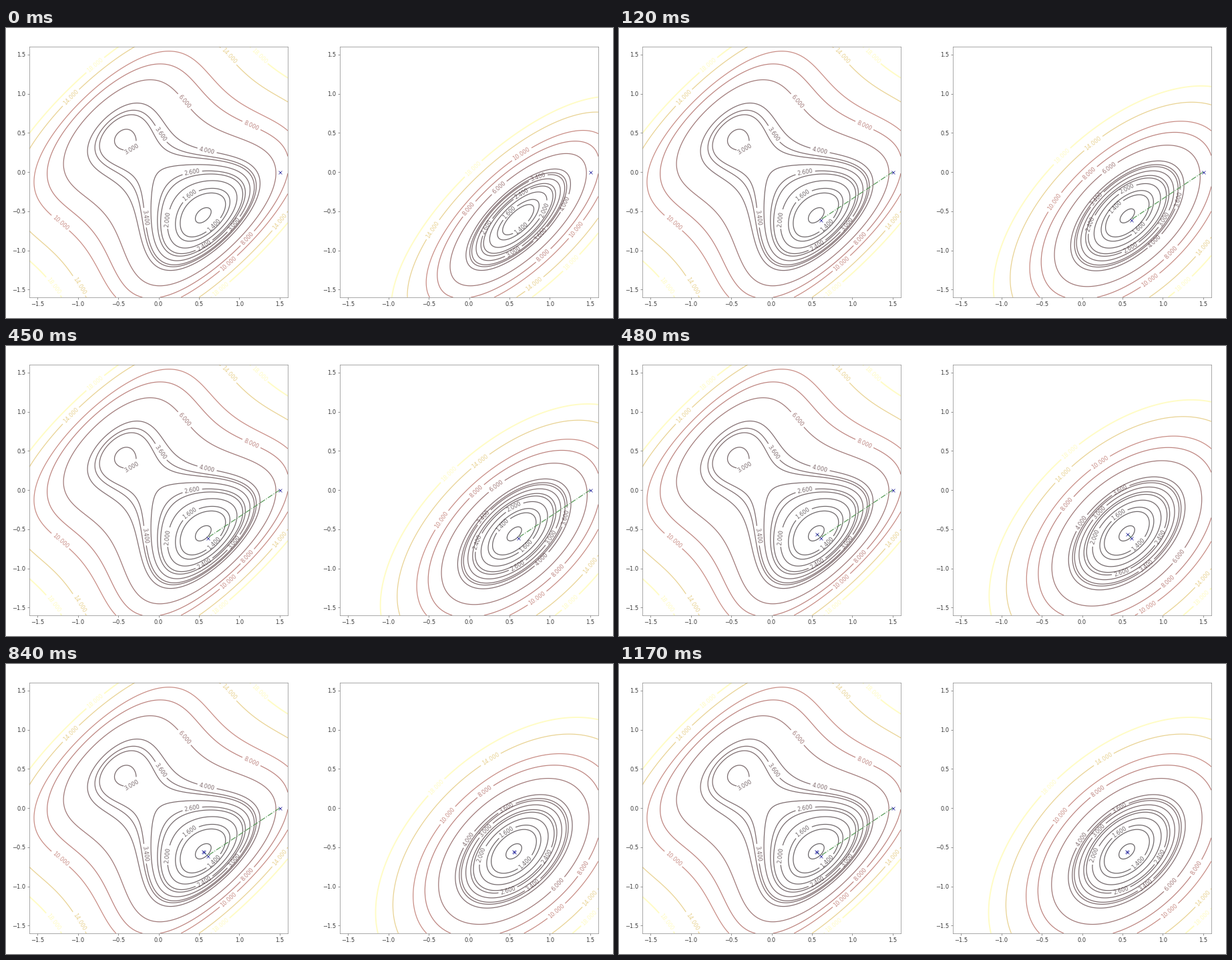
Write a matplotlib script that moves like this. It is 909x435 px and loops after 1.2 s.

```python
import numpy as np
import matplotlib.pyplot as plt
from matplotlib.animation import FuncAnimation
from matplotlib.colors import LinearSegmentedColormap

W, H, DPI = 909, 435, 60
LIM = 1.6
LEVELS = [1, 1.4, 1.6, 2, 2.4, 2.6, 3, 3.4, 3.6, 4, 6, 8, 10, 14, 18]
CMAP = LinearSegmentedColormap.from_list("heat", [
    (0, "#1f181c"), (.18, "#452529"), (.41, "#9c463f"),
    (.53, "#ad5347"), (.76, "#dcba58"), (1, "#fffba6")])


# With s = x - y and t = x + y the surface is g(s) + 2 t^2
def g(s):
    return s**4 - 2 * s**2 - s + 3


def slope(s):
    return 4 * s**3 - 4 * s - 1


def curvature(s):
    return 12 * s**2 - 4


def surface(x, y):
    return g(x - y) + 2 * (x + y)**2


def quadratic(s0, x, y):
    """Second-order model of the surface around s0."""
    d = x - y - s0
    return g(s0) + slope(s0) * d + curvature(s0) / 2 * d**2 + 2 * (x + y)**2


def draw_levels(ax, z):
    """Draw labelled contours and return all their artists."""
    widths = [1.5] * (len(LEVELS) - 1) + [2.3]
    cs = ax.contour(x, y, z, levels=LEVELS, linewidths=widths,
                    cmap=CMAP, alpha=.66)
    labels = ax.clabel(cs, fontsize=10, fmt="%1.3f", inline_spacing=3)
    return [cs, *labels]


def make_axes(left):
    ax = fig.add_axes([left / W, 31 / H, 387 / W, 376 / H])
    ticks = np.arange(-1.5, 1.6, .5)
    ax.set(xlim=(-LIM, LIM), ylim=(-LIM, LIM), xticks=ticks, yticks=ticks)
    return ax


def make_trail(ax):
    return ax.plot([], [], ls="-.", lw=1.5, color="#5a9c5a", marker="x",
                   ms=6, mec="#3c3ca8", zorder=5)[0]


plt.rcParams.update({
    "font.family": "DejaVu Sans", "axes.edgecolor": "#808080",
    "xtick.color": "#606060", "ytick.color": "#606060",
    "xtick.labelcolor": "#383838", "ytick.labelcolor": "#383838"})
fig = plt.figure(figsize=(W / DPI, H / DPI), dpi=DPI, facecolor="white")
left_ax, right_ax = make_axes(35), make_axes(500)
x, y = np.meshgrid(*[np.linspace(-LIM, LIM, 193)] * 2)

# Newton iterates; after the first step t stays zero
steps = [1.5]
for _ in range(3):
    steps.append(steps[-1] - slope(steps[-1]) / curvature(steps[-1]))
points = np.array([(1.5, 0)] + [(s / 2, -s / 2) for s in steps[1:]])

draw_levels(left_ax, surface(x, y))
models = [draw_levels(right_ax, quadratic(s, x, y)) for s in steps]
left_trail, right_trail = make_trail(left_ax), make_trail(right_ax)


def update(i):
    k = 0 if i < 4 else 1 + (i - 4) // 12
    for j, group in enumerate(models):
        for artist in group:
            artist.set_visible(j == k)
    left_trail.set_data(*points[:k + 1].T)
    right_trail.set_data(*points[max(k - 1, 0):k + 1].T)
    return left_trail, right_trail


anim = FuncAnimation(fig, update, frames=40, interval=30, repeat=True,
                     repeat_delay=0, init_func=lambda: update(0), blit=False)
plt.show()
```
